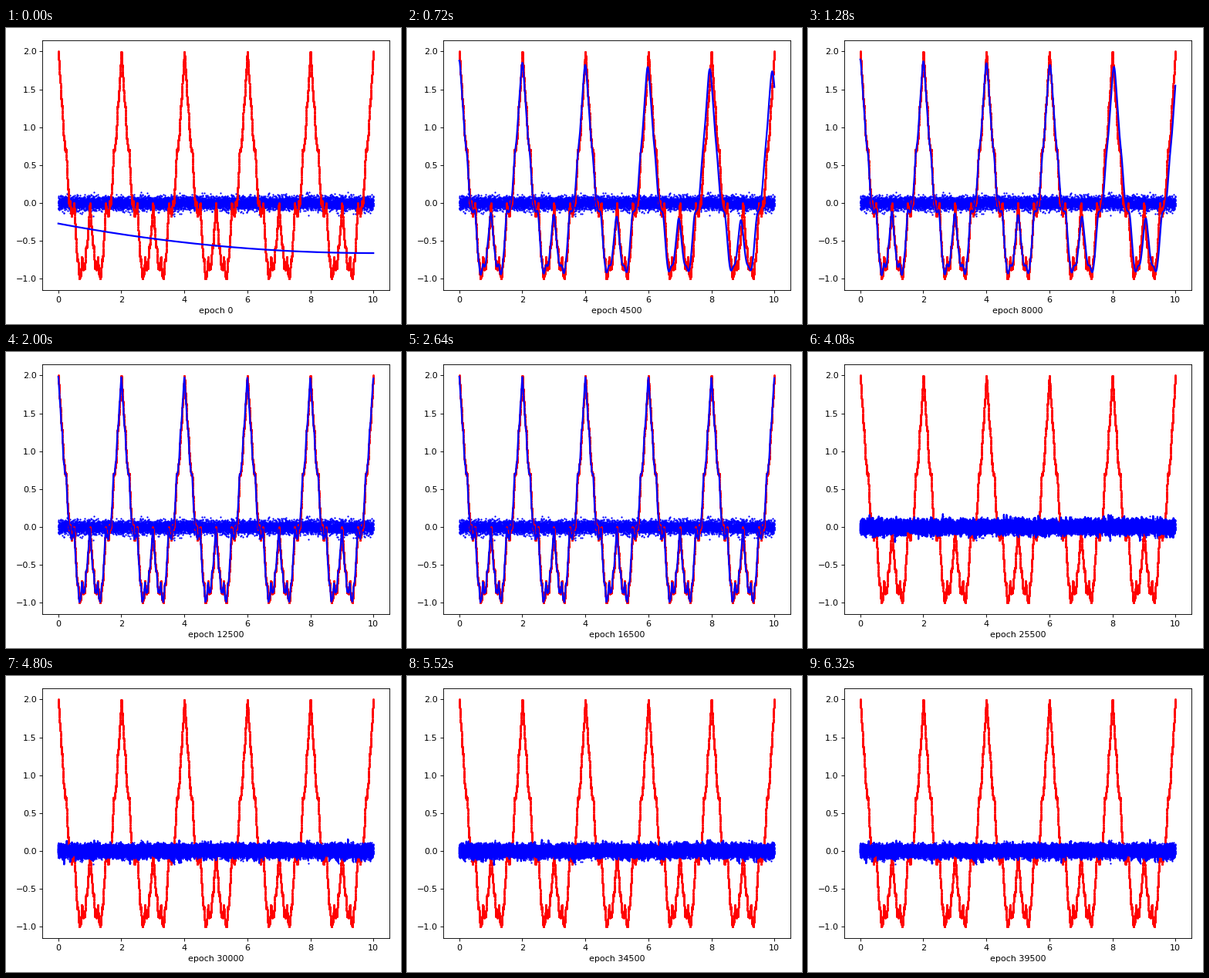
Animation of 512x384 px, one loop 6.4 s. Source, as a matplotlib script:

```python
import numpy as np
import matplotlib.pyplot as plt
from matplotlib.animation import FuncAnimation

FRAMES, INTERVAL = 80, 80
EPOCHS_PER_FRAME = 500
SWITCH = 40            # last frame that fits the wave; afterwards the noise
W, H, DPI = 512, 384, 80
POINTS = 10000

plt.rcParams["font.family"] = "DejaVu Sans"
plt.rcParams["agg.path.chunksize"] = 5000

rng = np.random.default_rng(4)
x = np.linspace(0, 10, POINTS)
noise = rng.normal(0, 0.043, POINTS)
residual_a = rng.normal(0, 1, POINTS)
residual_b = rng.normal(0, 1, POINTS)


def sigmoid(t):
    return 1 / (1 + np.exp(-t))


def wave(t, blur=0.0, terms=16):
    """Weierstrass sum, with each harmonic damped by a Gaussian blur."""
    total = np.zeros_like(t)
    for n in range(terms):
        freq = 2 ** n * np.pi
        total += 0.5 ** n * np.exp(-(freq * blur) ** 2 / 2) * np.cos(freq * t)
    return total


def wave_fit(k):
    start = -0.66 + 0.39 * (1 - x / 10) ** 2
    if k == 0:
        return start
    # the right end swings around the true phase until the fit settles
    swing = np.cos(np.pi * (k - 9) / 7) * sigmoid(20 - k)
    shift = -0.07 * sigmoid(x - 7) * swing
    blur = 0.004 + 0.026 * sigmoid((19 - k) / 1.5) + 0.1 * np.exp(-k / 2)
    fit = wave(x - shift, blur * (0.7 + x / 12), 12)
    # the fit spreads from left to right
    learned = sigmoid((1.35 * k - x) / 0.35)
    return learned * fit + (1 - learned) * start * np.exp(-k / 3)


def noise_fit(k):
    spread = 0.015 + 0.035 * np.exp(-(k - SWITCH - 1) / 8)
    mix = np.cos(k) * residual_a + np.sin(k) * residual_b
    return 0.92 * noise + spread * mix


fig = plt.figure(figsize=(W / DPI, H / DPI), dpi=DPI)
ax = fig.add_axes([47.4 / W, 43.8 / H, 449.2 / W, 324.5 / H])
ax.set_xlim(-0.5, 10.5)
ax.set_ylim(-1.15, 2.15)
ax.scatter(x, noise, s=1, color="blue", zorder=1)
ax.scatter(x, wave(x), s=2, color="red", zorder=2)
line, = ax.plot(x, wave_fit(0), color="blue", lw=2, zorder=2.2)
label = ax.set_xlabel("epoch 0")


def update(k):
    line.set_ydata(wave_fit(k) if k <= SWITCH else noise_fit(k))
    label.set_text(f"epoch {k * EPOCHS_PER_FRAME}")
    return line, label


anim = FuncAnimation(fig, update, frames=FRAMES, interval=INTERVAL,
                     repeat=True, repeat_delay=0)
plt.show()
```
